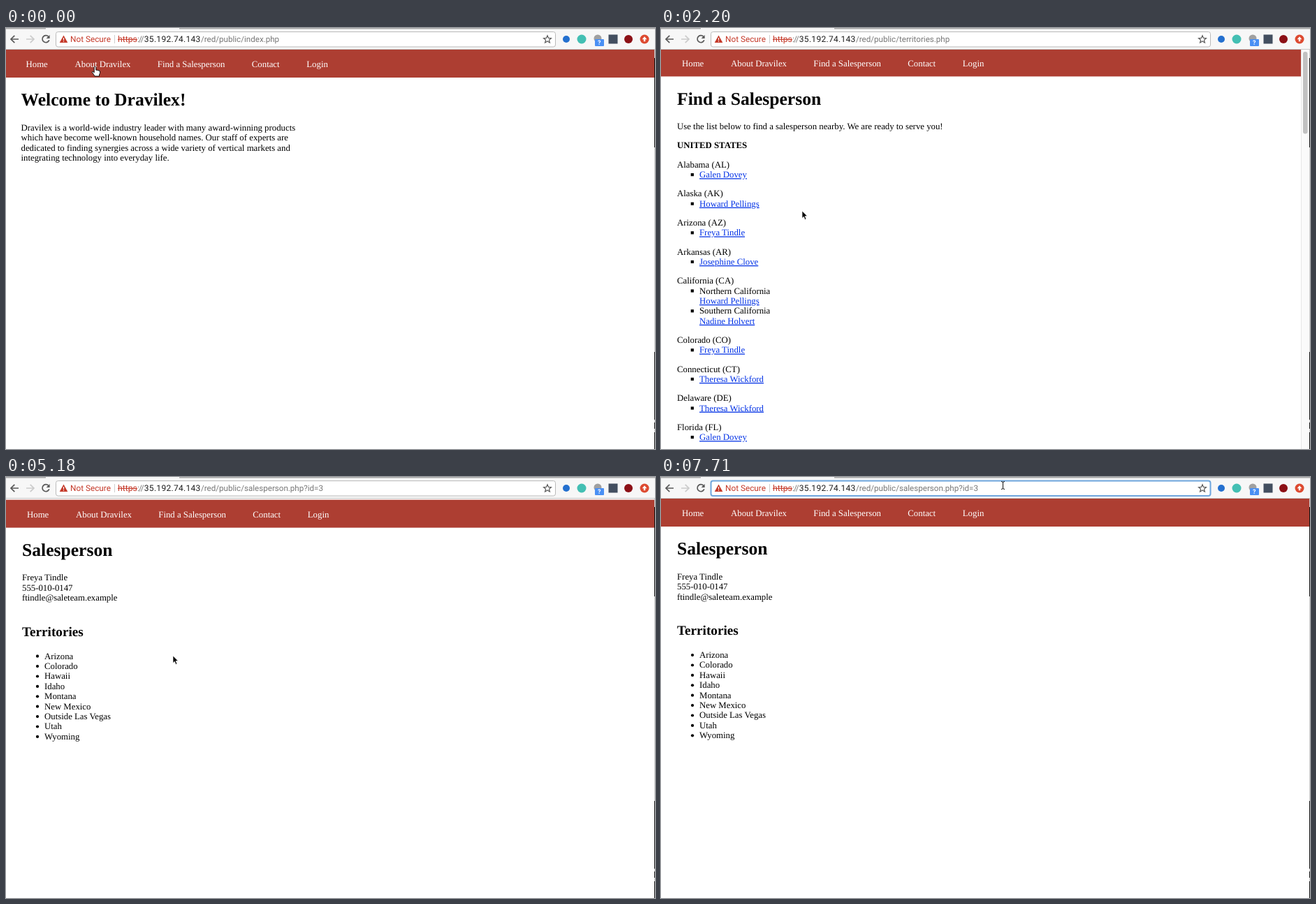
These frames come from a looping animation (929 by 603 pixels, 8 s). An HTML page:

```html
<!DOCTYPE html>
<html lang="en">
<head>
<meta charset="utf-8">
<title>Salesperson lookup</title>
<style>
html, body { margin: 0; width: 100%; height: 100%; overflow: hidden; background: #fff; }
svg { display: block; width: 929px; height: 603px; text-rendering: geometricPrecision; }
.page text { font: 12.8px "Liberation Serif", "Times New Roman", serif; }
.page .h1 { font-size: 25.6px; font-weight: bold; }
.page .h2 { font-size: 19.2px; font-weight: bold; }
.page .b { font-weight: bold; }
.page .nav { fill: #fff; }
.bar text { font: 11.6px Roboto, "Liberation Sans", sans-serif; }
.line { fill: none; stroke: #5a5a5a; stroke-width: 1.7; }
</style>
</head>
<body>
<svg viewBox="0 0 929 603">
  <g id="home" class="page"></g>
  <g id="list" class="page"></g>
  <g id="person" class="page"></g>
  <g id="scrollbar">
    <rect x="916" y="31" width="13" height="572" fill="#fafafa"/>
    <path d="M916.5 31V603" stroke="#e7e7e7"/>
    <rect id="thumb" x="919" y="33.6" width="6.5" height="117.5" rx="3.2" fill="#c1c1c1"/>
  </g>
  <path d="M928.5 31V603" stroke="#cfcfcf"/>
  <path d="M928.5 43V171M928.5 464V561M928.5 565V574M928.5 579V603" stroke="#111"/>

  <g class="bar">
    <rect width="929" height="31" fill="#f7f7f7"/>
    <path d="M0 .7H57M248 .7H929" stroke="#a9a9a9" stroke-width="1.4"/>
    <path d="M0 30.5H929" stroke="#c6c6c6"/>
    <path class="line" d="M18 16H7.5M12.3 10.8L7 16L12.3 21.2"/>
    <path class="line" style="stroke:#cbcbcb" d="M29 16H39.5M34.7 10.8L40 16L34.7 21.2"/>
    <g id="reload">
      <path class="line" d="M60.8 12.4A5 5 0 1 0 61.8 17.3"/>
      <path d="M62.6 10V15H57.6Z" fill="#5a5a5a"/>
    </g>
    <path id="stop" class="line" d="M52.3 11.3L61.7 20.7M61.7 11.3L52.3 20.7"/>
    <rect id="field" x="71.5" y="5.5" width="715" height="21.5" rx="3" fill="#fff"/>
    <path d="M82.5 10.5L88.3 21H76.7Z" fill="#c53929"/>
    <path d="M82.5 14V17.4M82.5 18.4V19.7" stroke="#fff" stroke-width="1.2"/>
    <text x="92" y="20" fill="#c53929" style="font-size:11.8px">Not Secure</text>
    <path d="M155.5 10V22" stroke="#cfcfcf"/>
    <rect id="selection" x="158.5" y="8" width="296" height="16" fill="#b3d7fe"/>
    <text x="160" y="20" fill="#c53929" style="font-size:12.2px">https</text>
    <path d="M160 16.5H188" stroke="#c53929"/>
    <text x="188" y="20" fill="#777" style="font-size:12px;letter-spacing:-.9px">://</text>
    <text x="197.8" y="20" fill="#1c1c1c" style="font-size:12px;letter-spacing:.3px">35.192.74.143</text>
    <text id="path" x="279" y="20" fill="#777"></text>
    <path class="line" style="stroke-width:1.2" d="M775 10.8L776.5 14.4L780.4 14.7L777.4 17.2L778.4 21L775 18.9L771.6 21L772.6 17.2L769.6 14.7L773.5 14.4Z"/>
    <circle cx="802" cy="16" r="5" fill="#2470cf"/>
    <circle cx="824" cy="16" r="6.5" fill="#43bfb3"/>
    <circle cx="847" cy="15" r="5.5" fill="#a0a0a0"/>
    <rect x="843" y="16" width="13" height="10" rx="1" fill="#4a90f4"/>
    <text x="847" y="24.4" fill="#fff" style="font-size:9px;font-weight:bold">?</text>
    <rect x="862.5" y="9.5" width="13" height="13" fill="#434f60"/>
    <circle cx="891" cy="16" r="6" fill="#8c1016"/>
    <circle cx="914" cy="16" r="6.5" fill="#dd4a30"/>
    <path d="M914 12.3L917.4 16.2H915.2V19.2H912.8V16.2H910.6Z" fill="#fff"/>
  </g>

  <path id="hand" fill="#fff" stroke="#111" d="M-1.3 1Q0-1 1.3 1V5.2L3.2 5.4L5.5 6L7 6.8V9.6L6 12V14H-.5L-2 11.5L-4.3 8.3Q-4.2 6.8-2.6 7.6L-1.3 8.8Z"/>
  <path id="arrow" stroke="#fff" stroke-width=".7" d="M0 0V10.5L2.4 8.3L4 12.4L5.9 11.6L4.2 7.6H7.4Z"/>
  <path id="beam" fill="none" stroke="#111" d="M-2.5-5.5Q0-5.5 0-4V4Q0 5.5-2.5 5.5M2.5-5.5Q0-5.5 0-4M0 4Q0 5.5 2.5 5.5"/>
</svg>
<script>
const $ = id => document.getElementById(id);
const LINE = 14.4, GAP = 12.8, LINK = '#0433e6';

const text = (x, y, str, cls = '') => `<text x="${x}" y="${y}" class="${cls}">${str}</text>`;
const lines = (x, y, rows) => rows.map((row, i) => text(x, y + i * LINE, row)).join('');
const link = (y, name) =>
  `<text x="55" y="${y}" fill="${LINK}" text-decoration="underline">${name}</text>`;
const square = y => `<rect x="42.7" y="${y - 6.2}" width="4.2" height="4.2"/>`;
const dot = y => `<circle cx="45" cy="${y - 3.9}" r="2.1"/>`;

const header = title => '<rect x="-9" y="31" width="950" height="40" fill="#ad3e32"/>' +
  [['Home', 30], ['About Dravilex', 100], ['Find a Salesperson', 218.3], ['Contact', 353.3], ['Login', 431.8]]
    .map(([label, x]) => text(x, 56.2, label, 'nav')).join('') + text(23, 111.2, title, 'h1');

const people = {
  G: 'Galen Dovey', H: 'Howard Pellings', F: 'Freya Tindle',
  J: 'Josephine Clove', N: 'Nadine Holvert', T: 'Theresa Wickford'
};
const states = [
  ['Alabama (AL)', 'G'], ['Alaska (AK)', 'H'], ['Arizona (AZ)', 'F'], ['Arkansas (AR)', 'J'],
  ['California (CA)', 'H', 'Northern California', 'N', 'Southern California'],
  ['Colorado (CO)', 'F'], ['Connecticut (CT)', 'T'], ['Delaware (DE)', 'T'],
  ['Florida (FL)', 'G'], ['Georgia (GA)', 'G'], ['Hawaii (HI)', 'F']
];

function directory() {
  let y = 201.4, out = '';
  for (const [state, ...entries] of states) {
    out += text(23, y, state);
    for (let i = 0; i < entries.length; i += 2) {
      out += square(y += LINE);
      if (entries[i + 1]) {
        out += text(55, y, entries[i + 1]);
        y += LINE;
      }
      out += link(y, people[entries[i]]);
    }
    y += LINE + GAP;
  }
  return out;
}

$('home').innerHTML = header('Welcome to Dravilex!') + lines(23, 146.8, [
  'Dravilex is a world-wide industry leader with many award-winning products',
  'which have become well-known household names. Our staff of experts are',
  'dedicated to finding synergies across a wide variety of vertical markets and',
  'integrating technology into everyday life.'
]);
$('home').setAttribute('transform', 'translate(-1.5 0)');

$('list').innerHTML = header('Find a Salesperson') +
  text(23, 146.9, 'Use the list below to find a salesperson nearby. We are ready to serve you!') +
  text(23, 174.1, 'UNITED STATES', 'b') + directory();

const territories = ['Arizona', 'Colorado', 'Hawaii', 'Idaho', 'Montana', 'New Mexico',
  'Outside Las Vegas', 'Utah', 'Wyoming'];
$('person').innerHTML = header('Salesperson') +
  lines(23, 146.8, [people.F, '555-010-0147', 'ftindle@saleteam.example']) +
  text(23, 226.4, 'Territories', 'h2') + lines(55, 259, territories) +
  territories.map((_, i) => dot(259 + i * LINE)).join('');

// Each move: first step time, last step time, number of steps, then the values reached.
function track(start, moves, t) {
  let now = start;
  for (const [from, to, steps, ...goal] of moves) {
    if (t < from) break;
    const n = Math.min(steps, Math.floor((t - from) / (to - from || 1) * (steps - 1)) + 1);
    now = now.map((v, i) => v + (goal[i] - v) * n / steps);
  }
  return now;
}

const pointerMoves = [
  [150, 740, 5, 262, 51],
  [1610, 2060, 4, 202, 262],
  [2800, 3390, 5, 99, 241],
  [5180, 5180, 1, 239, 256],
  [5630, 6220, 5, 453, 13],
  [7260, 7710, 4, 489.5, 12]
];
const scrollMoves = [
  [2060, 2060, 1, 1.6],
  [2210, 2350, 2, 9.6],
  [2650, 2650, 1, 52.8]
];
const paths = { home: 'index.php', list: 'territories.php', person: 'salesperson.php?id=3' };

const within = (t, a, b) => t >= a && t < b;
const show = (id, on) => $(id).style.display = on ? '' : 'none';
const shift = (id, x, y) => $(id).setAttribute('transform', `translate(${x} ${y})`);

function draw(t) {
  const page = t < 1170 ? 'home' : t < 4740 ? 'list' : 'person';
  for (const id in paths) show(id, id === page);
  $('path').textContent = '/red/public/' + paths[page];

  const [scroll] = track([0], scrollMoves, t);
  shift('list', 0, -scroll);
  shift('thumb', 0, scroll * .2);
  shift('person', 0, within(t, 5180, 5630) ? 1.6 : 0);
  show('scrollbar', page === 'list');

  const loading = within(t, 880, 1310) || within(t, 4590, 4880);
  show('stop', loading);
  show('reload', !loading);

  const focused = t >= 6520;
  $('field').setAttribute('stroke', focused ? '#6ea6dd' : '#bababa');
  $('field').setAttribute('stroke-width', focused ? 2 : 1);
  show('selection', within(t, 6670, 7260));

  const [x, y] = track([127.5, 55], pointerMoves, t);
  const overLink = t < 290 || within(t, 590, 1610) || within(t, 3240, 4880);
  const pointer = y < 28 ? 'beam' : overLink ? 'hand' : 'arrow';
  for (const id of ['beam', 'hand', 'arrow']) show(id, id === pointer);
  shift(pointer, x, y);
}

function frame(now) {
  draw(now % 8000);
  requestAnimationFrame(frame);
}
draw(0);
requestAnimationFrame(frame);
</script>
</body>
</html>
```
